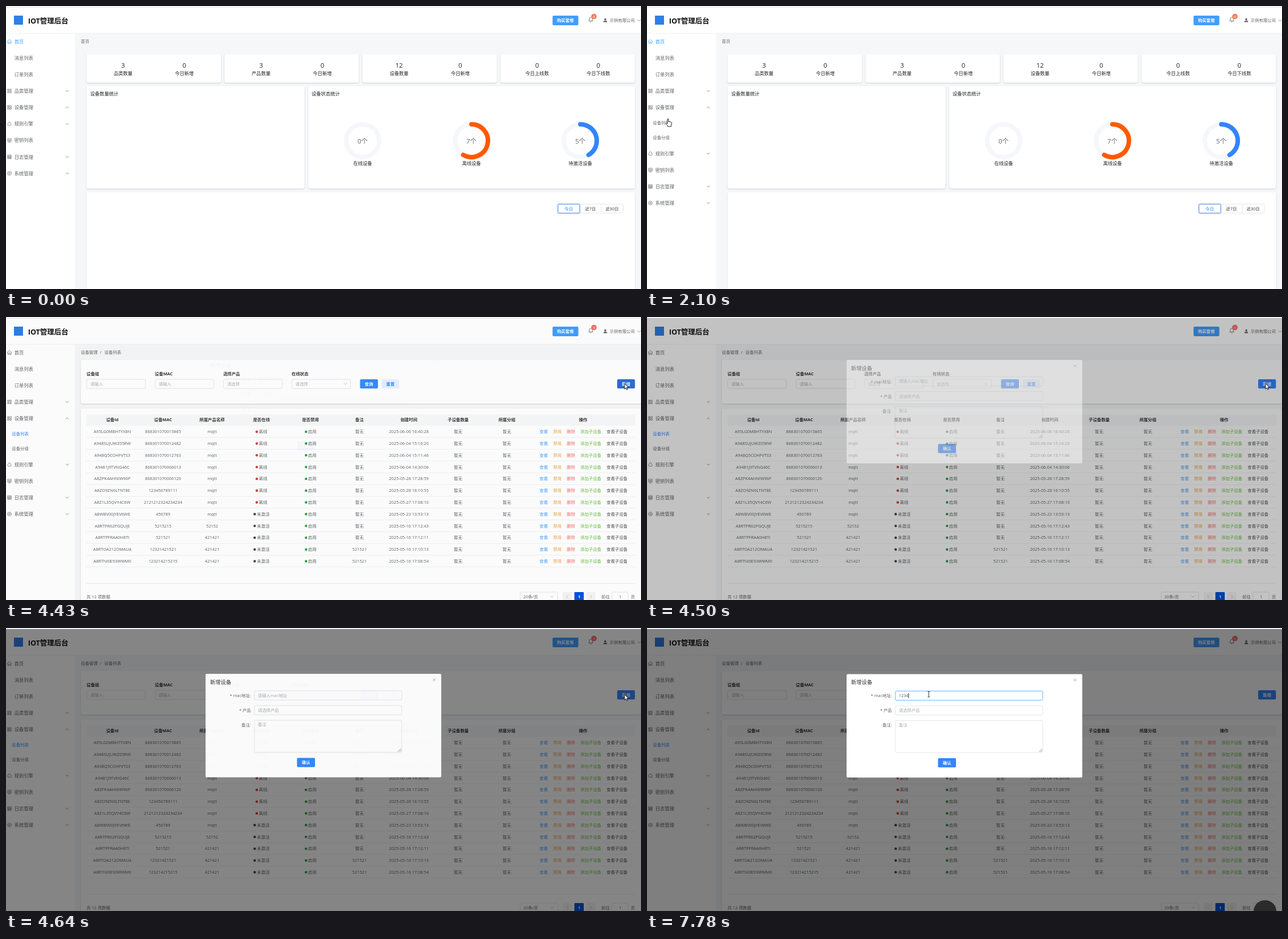
An HTML page that plays this animation: 1120x500 px, repeating every 8000 ms.

```html
<!DOCTYPE html>
<html>
<head>
<meta charset="utf-8">
<title>IOT管理后台</title>
<style>
  html, body { margin: 0; width: 100%; height: 100%; overflow: hidden; background: #fff; }
  svg { display: block; width: 1120px; height: 500px; }
  text { font-family: "Open Sans", "Noto Sans CJK SC", "Noto Sans CJK", "Noto Sans", sans-serif; white-space: pre; }
  .card { fill: #fff; filter: drop-shadow(0 1.6px 1.2px rgba(0, 0, 0, .16)); }
</style>
</head>
<body>
<svg id="stage" viewBox="0 0 1120 500" xmlns="http://www.w3.org/2000/svg"></svg>
<script>
const LOOP = 8000;
const BLUE = '#3385ff', SKY = '#409eff', GREY = '#606266', DARK = '#222', HINT = '#a8abb2', EDGE = '#dcdfe6';
const stage = document.getElementById('stage');

function add(parent, tag, attrs, content) {
  const node = document.createElementNS('http://www.w3.org/2000/svg', tag);
  set(node, attrs);
  if (content !== undefined) node.textContent = content;
  parent.appendChild(node);
  return node;
}
function set(node, attrs) {
  for (const key in attrs) node.setAttribute(key, attrs[key]);
}
const group = (parent, attrs = {}) => add(parent, 'g', attrs);
const show = (node, on) => set(node, { visibility: on ? 'visible' : 'hidden' });
const rect = (p, x, y, width, height, fill, more = {}) =>
  add(p, 'rect', { x, y, width, height, fill, ...more });
const card = (p, x, y, w, h) => rect(p, x, y, w, h, '#fff', { rx: 3, class: 'card' });
const line = (p, d, stroke = GREY, more = {}) =>
  add(p, 'path', { d, stroke, fill: 'none', 'stroke-width': .8, ...more });
const dot = (p, cx, cy, r, fill) => add(p, 'circle', { cx, cy, r, fill });

// y is the optical middle of the line of text
function label(p, x, y, str, size = 7.4, fill = GREY, anchor = 'start', weight = 400) {
  return add(p, 'text', { x, y: y + size * .37, 'font-size': size, fill, 'text-anchor': anchor, 'font-weight': weight }, str);
}
const centred = (p, x, y, str, size, fill, weight) => label(p, x, y, str, size, fill, 'middle', weight);
const chevron = (p, x, y, color = '#777') => line(p, `M${x - 2.6} ${y - 1.3}l2.6 2.6l2.6-2.6`, color);

function button(p, x, y, w, h, str, fill, color = '#fff') {
  const box = rect(p, x, y, w, h, fill, { rx: 2 });
  centred(p, x + w / 2, y + h / 2, str, 7.4, color, 700);
  return box;
}
function field(p, x, y, w, h, hint, hintY = y + h / 2) {
  const box = rect(p, x, y, w, h, '#fff', { rx: 2, stroke: EDGE, 'stroke-width': .8 });
  return { box, hint: label(p, x + 6.3, hintY, hint, 7.4, HINT) };
}

rect(stage, 0, 0, 1120, 500, '#f5f7f9');

// ---- home page
const home = group(stage);
label(home, 132, 62, '首页');
const counters = [
  ['3', '品类数量', '0', '今日新增'], ['3', '产品数量', '0', '今日新增'],
  ['12', '设备数量', '0', '今日新增'], ['0', '今日上线数', '0', '今日下线数']
];
counters.forEach((c, i) => {
  const x = 142 + i * 243.4;
  card(home, x, 85, 237, 50.5);
  [64.5, 172.5].forEach((dx, k) => {
    centred(home, x + dx, 104.5, c[k * 2], 11.4, DARK);
    centred(home, x + dx, 119.3, c[k * 2 + 1], 8.3, DARK);
  });
});
card(home, 142, 141.5, 384.5, 181);
card(home, 533, 141.5, 576.5, 181);
card(home, 142, 329, 967.5, 190);
label(home, 148.5, 154.5, '设备数量统计', 8.3, DARK);
label(home, 539, 154.5, '设备状态统计', 8.3, DARK);
[[629, 0, '在线设备', ''], [821, 7, '离线设备', '#ff5a00'], [1013, 5, '待激活设备', BLUE]].forEach(([x, n, name, color]) => {
  const r = 29, a = n / 12 * 2 * Math.PI;
  add(home, 'circle', { cx: x, cy: 238, r, fill: 'none', stroke: '#f5f7fa', 'stroke-width': 8 });
  if (n) line(home, `M${x} ${238 - r}A${r} ${r} 0 ${n > 6 ? 1 : 0} 1 ${x + r * Math.sin(a)} ${238 - r * Math.cos(a)}`,
    color, { 'stroke-width': 8, 'stroke-linecap': 'round' });
  centred(home, x, 238.5, n + '个', 11.4, GREY);
  centred(home, x, 277.5, name, 8.3, DARK);
});
rect(home, 973.5, 350, 115, 16, '#fff', { rx: 2, stroke: EDGE, 'stroke-width': .8 });
line(home, 'M1050 350v16', EDGE);
rect(home, 973.5, 350, 38.5, 16, '#fff', { rx: 1.5, stroke: '#2f7be0' });
['今日', '近7日', '近30日'].forEach((s, i) => centred(home, 992.5 + i * 38.3, 358, s, 7.4, i ? '#333' : '#2f7be0'));

// ---- device list page
const devices = group(stage);
const crumbs = group(devices);
const crumbA = group(crumbs), crumbB = group(crumbs);
label(crumbA, 132, 62, '设备管理');
label(crumbA, 165.8, 62, '/');
label(crumbB, 173.5, 62, '设备列表');

card(devices, 132, 76, 988, 77);
[['设备组', '请输入'], ['设备MAC', '请输入'], ['选择产品', '请选择'], ['在线状态', '请选择']].forEach(([name, hint], i) => {
  const x = 142 + i * 120.6;
  label(devices, x, 100.5, name, 7.4, '#333', 'start', 700);
  field(devices, x + .4, 110, 103.5, 16.3, hint);
});
chevron(devices, 598.5, 118, HINT);
button(devices, 624.5, 110, 31.5, 16.3, '查询', BLUE);
button(devices, 662.5, 110, 31, 16.3, '重置', '#e6f0ff', BLUE);
const addButton = button(devices, 1078, 110, 31.3, 16.3, '新增', BLUE);

card(devices, 132, 161.5, 988, 360);
rect(devices, 142, 172, 968, 20, '#f7f8fa');
const columns = [187.5, 277, 363.5, 450.5, 537, 623.5, 710.5, 797.5, 883.5, 1018];
['设备id', '设备MAC', '所属产品名称', '是否在线', '是否禁用', '备注', '创建时间', '子设备数量', '所属分组', '操作']
  .forEach((s, i) => centred(devices, columns[i], 181.7, s, 7.4, '#333', 700));
const table = group(devices);
const records = `A95LG0MBHTYX8N 868301070015865 mqtt 06-06 16:40:28
A948SUJUWZ05RW 868301070012482 mqtt 06-04 15:16:20
A948Q5COHFVTS3 868301070012763 mqtt 06-04 15:11:46
A9481J9TVNG46C 868301070006013 mqtt 06-04 14:30:06
A8ZPK4AHNIW96P 868301070006120 mqtt 05-28 17:28:59
A8ZO9ZN6LTNT8E 123456789111 mqtt 05-28 16:10:55
A8Z1L35QVY4C6W 2121212324234234 mqtt 05-27 17:08:10
A8WBV00JYEV6WE 456789 mqtt 05-23 13:53:13
A8RTPR62PGQUJE 5215215 52152 05-16 17:12:43
A8RTPFRAA0H8TI 521521 421421 05-16 17:12:11
A8RTOA212OMAUA 12321421521 421421 05-16 17:10:13
A8RTNI0E93WWM0 123214215215 421421 05-16 17:08:54`.split('\n');
const actions = [[941, '查看', SKY], [965, '禁用', '#e6a23c'], [989, '删除', '#f56c6c'], [1013, '添加子设备', '#67c23a'], [1059.3, '查看子设备', '#555']];
records.forEach((record, i) => {
  const [id, mac, product, day, time] = record.split(' ');
  const y = 202.5 + i * 20.8, offline = i < 7;
  const cells = [id, mac, product, '', '', i < 10 ? '暂无' : '521521', `2025-${day} ${time}`, '暂无', '暂无'];
  cells.forEach((s, k) => s && centred(table, columns[k], y, s, 7.4, GREY));
  dot(table, offline ? 442.3 : 438.6, y + .2, 2.2, offline ? '#d93a2b' : '#444');
  label(table, offline ? 446 : 442.6, y, offline ? '离线' : '未激活');
  dot(table, 529.2, y + .2, 2.2, '#1fa53c');
  label(table, 532.8, y, '启用');
  actions.forEach(([x, s, color]) => label(table, x, y, s, 7.4, color));
  line(table, `M142 ${y + 10.4}H1110`, '#ebeef5');
});
line(devices, 'M142 470.5H1110', '#e4e7ed');
label(devices, 142, 494, '共 12 项数据');
field(devices, 907, 486, 66, 17, '');
label(devices, 912.5, 494, '20条/页');
chevron(devices, 963, 494, HINT);
rect(devices, 982, 486, 16, 17, '#f4f4f5', { rx: 1 });
rect(devices, 1002.5, 486, 16.5, 17, '#0052d9', { rx: 1 });
rect(devices, 1023.5, 486, 16, 17, '#f4f4f5', { rx: 1 });
line(devices, 'M991 491.5l-2.4 2.5l2.4 2.5M1030.5 491.5l2.4 2.5l-2.4 2.5', '#b5b8bf');
centred(devices, 1011, 494, '1', 7.4, '#fff', 700);
label(devices, 1050, 494, '前往');
field(devices, 1069, 486, 28, 17, '');
centred(devices, 1083, 494, '1');
label(devices, 1102, 494, '页');

// ---- side menu
rect(stage, 0, 48, 121.5, 452, '#fff');
const menu = group(stage), lowerMenu = group(menu);
const icons = {
  home: 'M-4 0L0-3.6L4 0M-2.9-.8V3.5H-.9V1H.9V3.5H2.9V-.8',
  grid: 'M-3.2-3.2h2.4v2.4h-2.4zM.8-3.2h2.4v2.4H.8zM-3.2.8h2.4v2.4h-2.4zM.8.8h2.4v2.4H.8z',
  server: 'M-3.3-3.2h6.6v2.6h-6.6zM-3.3.8h2.6v2.4h-2.6zM.8.8h2.5v2.4H.8zM-2-1.9h2',
  rule: 'M-1.5-2.5a2 2 0 0 1 3 0L3 .5a1.5 1.5 0 0 1-1 2.3h-4A1.5 1.5 0 0 1-3 .5z',
  key: 'M-3.2-3.2h6.4V1.8h-6.4zM-2 3.4h4M-1.6-1h1.2v1h-1.2zM.6-1h1.2v1H.6z',
  log: 'M-3.2-3.2h6.4v6.4h-6.4zM-3.2-1.2h6.4M-1 -1.2v4.4M1.2-1.2v4.4M-3.2 1h6.4',
  gear: 'M0-3.6L3.2-1.8V1.8L0 3.6L-3.2 1.8V-1.8zM-1.3 0a1.3 1.3 0 1 0 2.6 0a1.3 1.3 0 1 0-2.6 0'
};
const entries = [['首页', 'home'], ['消息列表'], ['订单列表'], ['品类管理', 'grid', 1], ['设备管理', 'server', 1],
  ['规则引擎', 'rule', 1], ['密钥列表', 'key'], ['日志管理', 'log', 1], ['系统管理', 'gear', 1]];
const homeEntry = [];
let deviceChevron;
entries.forEach(([name, icon, opens], i) => {
  const p = i > 4 ? lowerMenu : menu, y = 62.7 + i * 29.12;
  const text = label(p, 14.8, y, name, 8.3);
  if (icon) {
    const mark = line(p, icons[icon], GREY, { transform: `translate(6 ${y})`, 'stroke-width': .7 });
    if (!i) homeEntry.push([text, 'fill'], [mark, 'stroke']);
  }
  if (i === 4) deviceChevron = line(p, 'M-2.6-1.3L0 1.3L2.6-1.3', '#777');
  else if (opens) chevron(p, 108, y);
});
const clip = add(add(stage, 'clipPath', { id: 'submenu' }), 'rect', { x: 0, y: 193.5, width: 121, height: 0 });
const submenu = group(menu, { 'clip-path': 'url(#submenu)' });
const listEntry = label(submenu, 10.3, 206.3, '设备列表');
label(submenu, 10.3, 232.5, '设备分组');

// ---- header
rect(stage, 0, 0, 1120, 48, '#fff');
line(stage, 'M0 48.2H1120', '#eceef1');
rect(stage, 14, 17, 16, 16, '#2f7fe8');
label(stage, 39, 26, 'IOT管理后台', 12.5, '#111', 'start', 700);
button(stage, 964, 17, 45.5, 17, '购买套餐', SKY);
line(stage, 'M1027.5 26.5h8M1028.7 26.3v-3.5a2.8 2.8 0 0 1 5.6 0v3.5M1030.5 28.3h2');
const badge = dot(stage, 1037, 18.5, 4.8, '#f56c6c');
centred(stage, 1037, 18.6, '4', 6, '#fff');
dot(stage, 1057, 23.6, 1.8, GREY);
add(stage, 'path', { d: 'M1053.6 28.6a3.4 2.9 0 0 1 6.8 0z', fill: GREY });
label(stage, 1064.8, 25.5, '示例有限公司');
chevron(stage, 1116.5, 25.5);
rect(stage, 0, 1.4, 1120, 1, '#dadcde');
const progress = rect(stage, 0, 1.6, 0, 1.6, '#2299dd');

// ---- dialog
const modal = group(stage);
const shade = rect(modal, 0, 2, 1120, 498, '#000');
const dialog = group(modal);
rect(dialog, 352, 81.5, 415.7, 182.7, '#fff', { rx: 2 });
label(dialog, 360, 96, '新增设备', 9.3, '#303133');
line(dialog, 'M753 89.8l4.4 4.4M757.4 89.8l-4.4 4.4', '#909399');
[[119.5, '* mac地址:'], [145.5, '* 产品'], [171.5, '备注:']].forEach(([y, s]) => label(dialog, 432, y, s, 7.4, GREY, 'end'));
const mac = field(dialog, 438, 111.4, 260, 16.2, '请输入mac地址', 119.3);
field(dialog, 438, 137.5, 260, 16.2, '请选择产品');
field(dialog, 438, 163.5, 260, 56.7, '备注', 171);
line(dialog, 'M691.5 219l5.5-5.5M694.5 219l2.5-2.5', '#777');
button(dialog, 513.3, 230, 31.7, 16.2, '确认', BLUE);
const typed = label(dialog, 444.2, 119.3, '', 7.4, GREY);
const caret = rect(dialog, 444, 115, .9, 9, '#222');

const pet = add(stage, 'ellipse', { cx: 1090, rx: 20, ry: 19, fill: '#2b2b2b' });

// ---- pointers, each drawn around its hot spot
const pointer = group(stage);
const outline = { fill: '#fff', stroke: '#111', 'stroke-width': .9, 'stroke-linejoin': 'round' };
const pointers = {
  hand: add(pointer, 'path', { d: 'M-1 1Q0-1 1 1V5.5L2.6 5.2L4.4 5.7L6 6.4Q6.8 7 6.6 9L5.6 12V14H-.6V12.6L-3.8 8.6Q-4.2 7 -2.6 7.3L-1 8.8z', ...outline }),
  arrow: add(pointer, 'path', { d: 'M0 0V9.8L2.3 7.7L3.8 11L5.3 10.3L3.9 7.2H7z', ...outline }),
  beam: line(pointer, 'M-2-5H-.6L0-4.4L.6-5H2M0-4.4V4.4M-2 5H-.6L0 4.4L.6 5H2', '#111', { 'stroke-width': .9 })
};
const path = [[90, 600, 505], [230, 131, 222], [400, 131, 222], [650, 62, 88], [860, 70, 172], [1030, 70, 172],
  [1240, 60, 180], [1420, 60, 180], [1800, 37, 222], [1890, 37, 222], [2040, 37, 199], [2600, 37, 199],
  [3030, 67, 209], [3420, 67, 209], [3940, 1091, 117.5], [4660, 1091, 117.5], [5010, 590, 122], [5110, 590, 122], [5280, 497, 117]];

const clamp = v => Math.min(1, Math.max(0, v));
const span = (t, from, length) => clamp((t - from) / length);

// CSS "ease": cubic-bezier(.25, .1, .25, 1)
function ease(x) {
  let lo = 0, hi = 1;
  for (let i = 0; i < 20; i++) {
    const u = (lo + hi) / 2;
    if (.75 * u * (1 - u) + u ** 3 < x) lo = u; else hi = u;
  }
  return .3 * lo * (1 - lo) ** 2 + 3 * lo * lo * (1 - lo) + lo ** 3;
}
function pointerAt(t) {
  const next = path.findIndex(p => p[0] > t);
  if (next < 0) return path[path.length - 1].slice(1);
  if (next === 0) return path[0].slice(1);
  const a = path[next - 1], b = path[next], k = (t - a[0]) / (b[0] - a[0]);
  return [a[1] + (b[1] - a[1]) * k, a[2] + (b[2] - a[2]) * k];
}

function render(now) {
  const t = Math.floor((now - 20) / 70) * 70 + 20;

  const open = ease(span(t, 1350, 300));
  set(clip, { height: 52.4 * open });
  set(lowerMenu, { transform: `translate(0 ${52.4 * open})` });
  set(deviceChevron, { transform: `translate(108 179.2) scale(1 ${1 - 2 * open})` });

  const onList = t >= 2630;
  show(home, !onList);
  show(devices, onList);
  show(table, t >= 2840);
  homeEntry.forEach(([node, attr]) => set(node, { [attr]: onList ? GREY : SKY }));
  set(listEntry, { fill: onList ? BLUE : GREY });
  const slide = ease(span(t, 2940, 420));
  set(crumbA, { transform: `translate(${20 * (1 - slide)} 0)` });
  set(crumbB, { transform: `translate(${15 * (1 - slide)} 0)` });
  set(crumbs, { opacity: t < 2900 ? 0 : .5 + .5 * slide });
  set(progress, { width: 1120 * span(t, 2560, 400), opacity: .6 * (1 - span(t, 2960, 250)) });
  set(badge, { fill: t < 3400 ? '#f58059' : '#f56c6c' });
  set(addButton, { fill: t >= 3930 && t < 4480 ? '#2d6cd6' : BLUE });

  const p = ease(span(t, 4415, 300));
  show(modal, p > 0);
  set(shade, { opacity: .5 * p });
  set(dialog, { opacity: p, transform: `translate(0 ${-11 * (1 - p)})` });

  const focused = now >= 5590;
  const count = [7120, 7250, 7510, 7780].filter(at => now >= at).length;
  set(mac.box, { stroke: focused ? SKY : EDGE });
  set(mac.hint, { opacity: count ? 0 : 1 });
  typed.textContent = '1234'.slice(0, count);
  set(caret, { x: 444 + count * 4.23, opacity: focused && (now < 6130 || now >= 6660) ? 1 : 0 });
  set(pet, { cy: 522 - 22 * ease(span(t, 5560, 210)) });

  const [x, y] = pointerAt(t);
  const kind = t >= 4990 ? 'beam' : x < 121 ? 'hand' : 'arrow';
  set(pointer, { transform: `translate(${x} ${y})`, opacity: t < 90 ? 0 : 1 });
  for (const name in pointers) set(pointers[name], { opacity: name === kind ? 1 : 0 });
}

const start = performance.now();
function tick() {
  render((performance.now() - start) % LOOP);
  requestAnimationFrame(tick);
}
tick();
</script>
</body>
</html>
```
